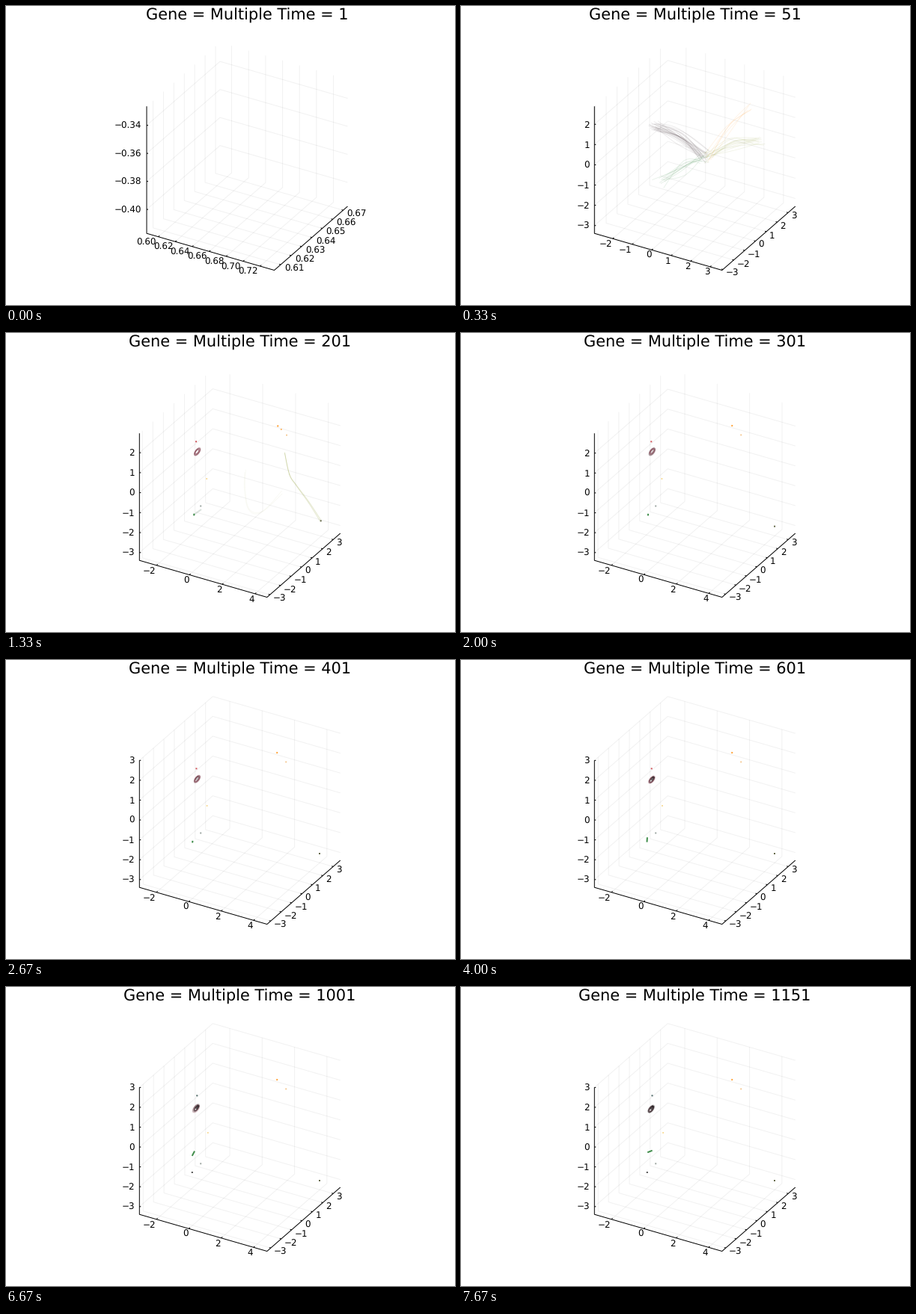
These frames come from a looping animation (600x400 px, 8000 ms). A matplotlib script:

```python
import numpy as np
import matplotlib.pyplot as plt
from matplotlib.animation import FuncAnimation

W, H = 600, 400
FRAMES, INTERVAL, STEPS = 200, 40, 24
PT = 0.72  # points per pixel at 100 dpi
OLIVE, ORANGE, GREEN, MAUVE = "#8c9a2e", "#ff9820", "#1f7a2c", "#8f5260"
ORIGIN = np.array([326, 202])

plt.rcParams.update({"font.family": "DejaVu Sans", "text.hinting": "none",
                     "path.snap": False})
fig = plt.figure(figsize=(W / 100, H / 100), dpi=100, facecolor="white")
ax = fig.add_axes([0, 0, 1, 1])


def line(pts, color, width=1.0, alpha=1.0):
    x, y = np.transpose(pts)
    ax.plot(x, y, color=color, lw=width * PT, alpha=alpha, solid_capstyle="butt")


def dot(p, color, alpha=0.85, size=2.0):
    line([(p[0] - size / 2, p[1]), (p[0] + size / 2, p[1])], color, size, alpha)


def label(x, y, text, size=11.95, ha="center"):
    ax.text(x, y, text, fontsize=size * PT, ha=ha, va="center_baseline")


def ease(t):
    t = np.clip(t, 0, 1)
    return t * t * (3 - 2 * t)


def glide(step, a, b, rate=1.6, start=2):
    """Move from a and settle exponentially on b."""
    a, b = np.asarray(a, float), np.asarray(b, float)
    return b + (a - b) * np.exp(-rate * max(step - start, 0))


def smooth(pts, closed=False):
    """Catmull-Rom curve through the points."""
    p = np.asarray(pts, float)
    p = np.vstack([p[-1], p, p[:2]]) if closed else np.vstack([p[0], p, p[-1]])
    t = np.linspace(0, 1, 8)[:, None]
    return np.vstack([
        0.5 * (2 * b + (c - a) * t + (2 * a - 5 * b + 4 * c - d) * t**2
               + (3 * b - a - 3 * c + d) * t**3)
        for a, b, c, d in zip(p, p[1:], p[2:], p[3:])])


def bundle(rng, pts, count, spread, color, alpha, closed=False):
    """Many faint curves scattered around one path."""
    pts = np.asarray(pts, float)
    for _ in range(count):
        jitter = rng.normal(0, spread, pts.shape) + rng.normal(0, spread / 2, 2)
        line(smooth(pts + jitter, closed), color, 0.85, alpha)


def limits(step):
    if step == 0:
        return (0.5863, 0.7367), (0.6039, 0.6743), (-0.4171, -0.3264)
    return (glide(step, (-2.94, 3.61), (-3.05, 4.83), 1.25),
            glide(step, (-3.08, 3.67), (-3.36, 3.69), 0.6),
            glide(step, (-3.387, 2.89), (-3.392, 3.006), 0.6))


def draw_box(step):
    digits = 0 if step else 2
    left = 178.3 if step else 188.0
    lims = limits(step)
    wide = lims[0][1] - lims[0][0] > 7
    spacing = (2 if wide else 1, 1, 1) if step else (0.02, 0.01, 0.02)

    def project(u, v, w):
        return np.array([left + 170.5 * u + 98 * v, 304.2 + 49.3 * u - 85.5 * v - 170 * w])

    # Per axis: grid path from the tick, tick vector, label offset, alignment
    axes = (
        (lambda s: [(s, 0, 0), (s, 1, 0), (s, 1, 1)], (1.6, -1.4), (-0.5 - 1.2 * digits, 6.4), "right"),
        (lambda s: [(1, s, 0), (0, s, 0), (0, s, 1)], (-2, -0.6), (3.8 + 0.6 * digits, 4.2), "left"),
        (lambda s: [(0, 0, s), (0, 1, s), (1, 1, s)], (2, 0), (-6.5, -0.3), "right"),
    )
    for (lo, hi), gap, (path, tick, offset, ha) in zip(lims, spacing, axes):
        for k in range(int(np.ceil(lo / gap)), int(np.floor(hi / gap)) + 1):
            pts = [project(*c) for c in path((k * gap - lo) / (hi - lo))]
            line(pts, "black", 1, 0.055)
            line([pts[0], pts[0] + tick], "black")
            text = f"{k * gap:.{digits}f}".replace("-", "\u2212")
            label(*(pts[0] + offset), text, ha=ha)

    corners = (0, 0, 1), (0, 0, 0), (1, 0, 0), (1, 1, 0)
    line([project(*c) for c in corners], "black")
    label(left + 134.2, 11, f"Gene = Multiple Time = {1 + 50 * step}", 20.9)


def draw_spread(rng):
    """Bundles leaving the common start point."""
    for end, color, count in (((258, 161), "#4a3a40", 24), ((270, 235), GREEN, 10),
                              ((400, 180), OLIVE, 12), ((389, 135), ORANGE, 5)):
        bundle(rng, [ORIGIN, (ORIGIN + end) / 2 - (0, 6), end], count, 4, color, 0.11)


def draw_orbits(rng, strength):
    """Fan below the blob and the large loop on the right."""
    fan = [(258, 159), (271, 176), (276, 193), (271, 216), (279, 231)]
    side = [(257, 162), (249, 188), (248, 207), (262, 208), (277, 230)]
    loop = [(393, 157), (365, 168), (334, 199), (332, 215),
            (335, 239), (354, 245), (397, 218), (413, 213)]
    bundle(rng, fan, int(36 * strength), 1.9, "#4a3a40", 0.09)
    bundle(rng, side, int(10 * strength), 2, "#4a3a40", 0.06)
    bundle(rng, loop, int(13 * strength), 1.1, OLIVE, 0.17, closed=True)


def draw_blob(step, rng):
    """Tilted ellipse of overlapping orbits that darkens along its top."""
    center = glide(step, (258.5, 161), (255.3, 158.7)) + np.array([-0.08, 0.28]) * max(step - 7, 0)
    along, across = np.array([0.6, -0.8]), np.array([0.8, 0.6])
    size = 1 - 0.25 * np.exp(2 - step)
    angle = np.linspace(0, 2 * np.pi, 30)[:, None]
    for _ in range(18):
        r = size * rng.uniform(0.5, 1)
        color = "#2a2426" if rng.random() < step / 40 else MAUVE
        orbit = r * (6.2 * np.cos(angle) * along + 2.8 * np.sin(angle) * across)
        line(center + rng.normal(0, 0.4, 2) + orbit, color, 0.9, 0.22)
    dark = ease((step - 4) / 10)
    mid = center + along * 2.2 * dark
    line([mid - 3 * along, mid + 3 * along], "#1a1518", 3, 0.7 * dark)


def draw_left(step):
    """Small groups on the left side."""
    dot(glide(step, (252.6, 144.6), (254, 145.3)) + np.array([0.07 * (step - 2), 0]),
        "#c83a40" if step < 20 else "#33524f")
    if step < 4:
        line([(253, 145), (258, 156)], ORANGE, 0.8, 0.3)
        line([(262.3, 244), (275, 232.5)], GREEN, 2, 0.75)
        return

    dot((267.8 + 0.1 * step, 195), "#f4c860", 0.7, 1.8)
    dot((260.2, 231.5 + 4.8 * ease((step - 12) / 4)), "#5f6f66", 0.6)
    if step < 6:
        line([(251, 243), (261, 236)], "#6f8a78", 2, 0.25)

    # The green group climbs, stretches and then tips over.
    p = np.clip((step - 9) / 14, 0, 1)
    at = glide(step, (251.3, 243), (248.4, 243.2), 0.3, 4) + np.array([4 * p**3, -23.2 * ease(p)])
    half = np.array([0.2 + 3 * p**3, -1.3 - 3 * np.sin(np.pi * p)])
    line([at - half, at + half], GREEN, 2, 0.85)
    if step >= 14:
        dot((248.8, 248), "#333333")


def draw_right(step, rng):
    """Orange pair, and the tail that collapses to a single point."""
    at = glide(step, (388.3, 134.2), (362.2, 124))
    half = glide(step, (2, 2.8), (0.9, 0.2))
    line([at - half, at + half], ORANGE, 2.1, 0.9)
    dot(glide(step, (395.5, 142.2), (374.2, 136.4)), "#f0b060", 0.75, 1.8)
    if step >= 4:
        dot(glide(step, (420.7, 251.3), (419, 259), start=4), "#4a4f2a")
    if 3 <= step <= 5:
        dot(at + 4.5, ORANGE, 0.85, 1.7)
        tail = [(372.5, 160), (379, 189), (388, 203.5), (404, 226), (420, 250.5)]
        arc = [(321, 184), (319.5, 208), (325, 236), (342, 239), (370, 213)]
        bundle(rng, tail, 6 - step, 0.4, OLIVE, 0.25)
        bundle(rng, arc, 6 - step, 0.8, OLIVE, 0.05)


def draw(frame):
    # The picture cuts to a new step just before each even division of the loop.
    step = int(frame * STEPS / FRAMES + 0.09)
    rng = np.random.default_rng(40 + step)
    ax.clear()
    ax.set(xlim=(0, W), ylim=(H, 0))
    ax.axis("off")
    draw_box(step)
    if step == 1:
        draw_spread(rng)
    elif step > 1:
        if step < 4:
            draw_orbits(rng, 1 if step == 2 else 0.35)
        draw_blob(step, rng)
        draw_left(step)
        draw_right(step, rng)
    return []


anim = FuncAnimation(fig, draw, frames=FRAMES, init_func=lambda: [],
                     interval=INTERVAL, repeat=True, repeat_delay=0)
plt.show()
```
